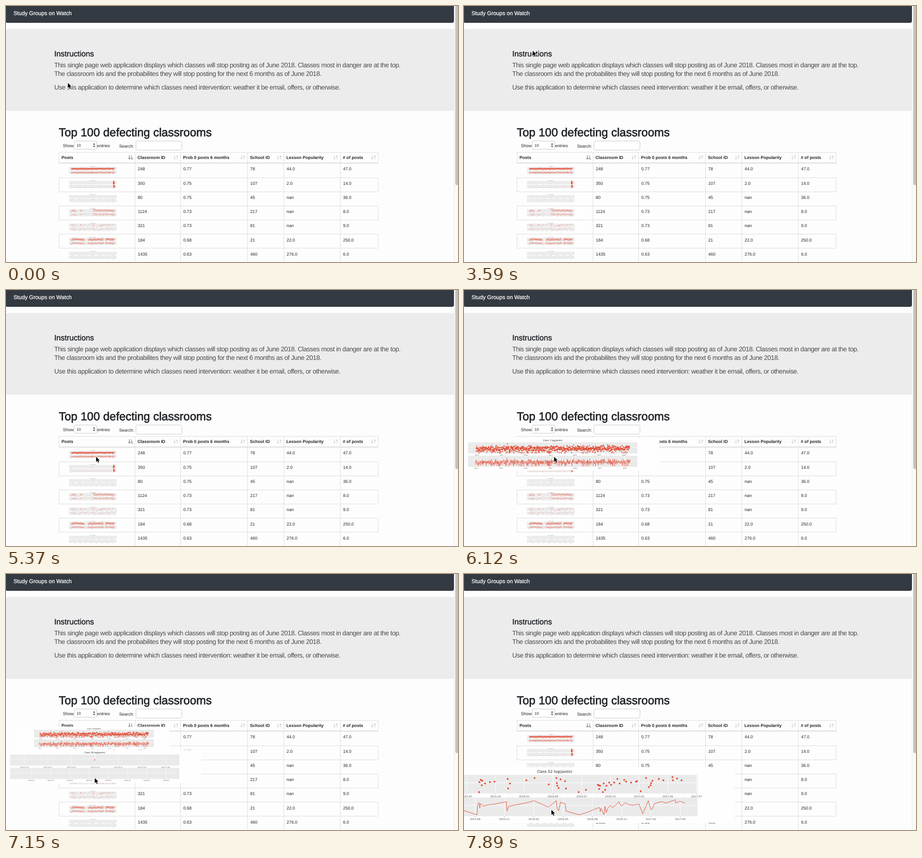
Write an HTML page that moves like this. It is 993 px wide and 564 px high and loops after 8 s.

```html
<!DOCTYPE html>
<html lang="en">
<head>
<meta charset="utf-8">
<title>Study Groups on Watch</title>
<style>
  html, body { margin: 0; width: 100%; height: 100%; overflow: hidden; background: #fdfdfd; }
  body { position: relative; }
  svg { position: absolute; display: block; text-rendering: geometricPrecision; }
  #page { left: 0; top: 0; width: 993px; height: 564px; font: 9.45px "Liberation Sans", Arial, sans-serif; fill: #212529; }
  .brand { font-size: 12.1px; fill: #fff; stroke: #fff; stroke-width: .3px; }
  .lead { font-size: 14.4px; letter-spacing: -.46px; fill: #484b4e; }
  .sub { font-size: 17.1px; stroke: #212529; stroke-width: .45px; }
  .title { font-size: 25.4px; stroke: #212529; stroke-width: .75px; }
  .head { font-weight: bold; }
  .small { font-size: 8.5px; }

  .chart { left: 189px; width: 135px; height: 20.5px; transform: translate(-50%, -50%); z-index: 0;
           font: 5.55px "DejaVu Sans", sans-serif; text-anchor: middle; }
  .chart .name { font-size: 8.1px; fill: #222; }
  .chart .tick { fill: #555; }
  .zoom1 { animation: zoom1 8s step-end infinite; }
  .zoom3 { animation: zoom3 8s step-end infinite; }
  .zoom5 { animation: zoom5 8s step-end infinite; }
  @keyframes zoom1 {
    0%      { width: 135px; height: 20.5px; z-index: 0; }
    76.5%   { width: 480px; height: 72.9px; z-index: 1; }
    78.25%  { width: 810px; height: 123px; z-index: 1; }
    89.375% { width: 340px; height: 51.6px; z-index: 1; }
    91.2%, 100% { width: 135px; height: 20.5px; z-index: 0; }
  }
  @keyframes zoom3 {
    0%      { width: 135px; height: 20.5px; z-index: 0; }
    89.375% { width: 480px; height: 72.9px; z-index: 1; }
    91.2%   { width: 810px; height: 123px; z-index: 1; }
    96.75%  { width: 340px; height: 51.6px; z-index: 1; }
    98.625%, 100% { width: 135px; height: 20.5px; z-index: 0; }
  }
  @keyframes zoom5 {
    0%      { width: 135px; height: 20.5px; z-index: 0; }
    96.75%  { width: 480px; height: 72.9px; z-index: 1; }
    98.625%, 100% { width: 810px; height: 123px; z-index: 1; }
  }

  #cursor { left: 0; top: 0; width: 11px; height: 17px; overflow: visible; z-index: 2;
            animation: point 8s step-end infinite; }
  @keyframes point {
    0%      { transform: translate(135px, 168px); }
    1.875%  { transform: translate(134px, 112px); }
    3.75%   { transform: translate(145px, 85px); }
    24.375% { transform: translate(145px, 86px); }
    30%     { transform: translate(145px, 88px); }
    33.625% { transform: translate(145px, 89px); }
    44.875% { transform: translate(150px, 97px); }
    46.71%  { transform: translate(161px, 110px); }
    48.55%  { transform: translate(185px, 142px); }
    50.39%  { transform: translate(214px, 190px); }
    52.23%  { transform: translate(229px, 240px); }
    54.07%  { transform: translate(222px, 285px); }
    55.91%  { transform: translate(208px, 318px); }
    57.75%  { transform: translate(199px, 337px); }
    59.625% { transform: translate(199px, 352px); }
    61.5%   { transform: translate(198px, 366px); }
    65.25%  { transform: translate(196px, 366px); }
    67.125% { transform: translate(197px, 366px); }
    82%     { transform: translate(197px, 372px); }
    83.84%  { transform: translate(196px, 390px); }
    85.68%  { transform: translate(195px, 412px); }
    87.5%   { transform: translate(194px, 433px); }
    89.375% { transform: translate(194px, 448px); }
    91.2%   { transform: translate(194px, 462px); }
    93.05%  { transform: translate(193px, 475px); }
    94.875% { transform: translate(193px, 485px); }
    96.75%  { transform: translate(192px, 503px); }
    98.625%, 100% { transform: translate(191px, 518px); }
  }
</style>
</head>
<body>
<svg id="page" viewBox="0 0 993 564"></svg>
<svg id="cursor" viewBox="0 0 11 17"><path d="M1 1.5v11.2l2.6-2.4 1.8 4.2 1.9-.8-1.8-4.1h3.5z" stroke="#fff" stroke-width="1.6" paint-order="stroke"/></svg>
<script>
const RED = '#e24a33', LINE = '#dcdcdc', PITCH = 31.25;
const text = (x, y, s, cls = '') => `<text x="${x}" y="${y}" class="${cls}">${s}</text>`;
const rect = (x, y, w, h, fill, more = '') => `<rect x="${x}" y="${y}" width="${w}" height="${h}" fill="${fill}" ${more}/>`;
const path = (d, color, width, more = '') => `<path d="${d}" fill="none" stroke="${color}" stroke-width="${width}" ${more}/>`;

const columns = [
  [116, 'Posts'], [283, 'Classroom ID'], [383, 'Prob 0 posts 6 months'],
  [530, 'School ID'], [610, 'Lesson Popularity'], [734, '# of posts'], [817]
];
const rows = [
  '248 0.77 78 44.0 47.0', '350 0.75 107 2.0 14.0', '80 0.75 45 nan 36.0', '1124 0.73 217 nan 8.0',
  '321 0.73 81 nan 9.0', '184 0.68 21 22.0 250.0', '1435 0.63 460 276.0 6.0'
].map(r => r.split(' '));
const rowTop = i => Math.floor(346.9 + 31.15 * i);

function drawPage() {
  const box = 'stroke="#c8c8c8" rx="3"';
  let s = rect(-.5, -5.5, 984, 42, '#343a42', 'rx="3" stroke="#2a2f36"')
    + rect(0, 50.5, 984, 180.5, '#ececec', 'rx="4"')
    + rect(984, 0, 9, 564, '#fafafa') + rect(984, 0, 1, 564, '#e9e9e9')
    + rect(987, -6, 8, 400.5, '#c2c2c2', 'rx="3.5"')
    + text(16.5, 19.5, 'Study Groups on Watch', 'brand')
    + text(106, 111, 'Instructions', 'sub')
    + text(106, 135, 'This single page web application displays which classes will stop posting as of June 2018. Classes most in danger are at the top.', 'lead')
    + text(106, 154, 'The classroom ids and the probabilites they will stop posting for the next 6 months as of June 2018.', 'lead')
    + text(106, 184, 'Use this application to determine which classes need intervention: weather it be email, offers, or otherwise.', 'lead')
    + text(116, 287, 'Top 100 defecting classrooms', 'title')
    + text(125, 311, 'Show') + text(200, 311, 'entries') + text(248.5, 312, 'Search:')
    + rect(149.5, 297.5, 50, 18, '#fff', box) + text(155, 310, '10', 'small')
    + rect(285.5, 297.5, 101, 20, '#fff', box)
    + '<path d="M191 305.5l2.5-3.2 2.5 3.2zM191 308l2.5 3.2 2.5-3.2z" fill="#444"/>';

  s += rect(116, 322, 702, 1, LINE) + rect(116, 345, 702, 2, LINE);
  columns.forEach(([x, name], i) => {
    const outer = i === 0 || i === columns.length - 1;
    if (outer) {
      s += rect(x, 322, 1, 24, LINE);
      for (let r = 1; r < 7; r += 2) s += rect(x, rowTop(r), 1, rowTop(r + 1) - rowTop(r), LINE);
    } else s += rect(x, 322, 1, 242, LINE);
    if (!name) return;
    s += text(x + 6, 337.3, name, 'head');
    const right = columns[i + 1][0];
    s += i
      ? path(`M${right - 12.5} 329v8m-2-2.2l2 2.4 2-2.4M${right - 7} 338v-8m-2 2.2l2-2.4 2 2.4`, '#cfcfcf', 1.1)
      : path('M271 329v8m-2-2.2l2 2.4 2-2.4M274.5 329.5h1.5m-1.5 2.6h2.5m-2.5 2.6h3.5m-3.5 2.6h4.5', '#777', 1.2);
  });
  rows.forEach((cells, i) => {
    if (i) s += rect(116, rowTop(i), 702, 1, LINE);
    cells.forEach((c, k) => s += text(columns[k + 1][0] + 6.5, 362.4 + PITCH * i, c));
  });
  document.getElementById('page').innerHTML = s;
}

function random(seed) {
  return () => {
    seed = seed + 0x6d2b79f5 | 0;
    let t = Math.imul(seed ^ seed >>> 15, 1 | seed);
    t = t + Math.imul(t ^ t >>> 7, 61 | t) ^ t;
    return ((t ^ t >>> 14) >>> 0) / 4294967296;
  };
}

// Noisy band of points within [from, to], with some outliers, low days and zero days.
function band(seed, from, to, count, spread = 5, mid = 40) {
  const rnd = random(seed);
  return Array.from({ length: count }, (_, i) => {
    const x = from + (to - from) * (i + rnd()) / count;
    const kind = rnd(), noise = (rnd() + rnd() + rnd() - 1.5) * 2;
    const y = kind < .035 ? 56
      : kind < .1 ? 46 + 9 * rnd()
      : kind < .11 ? 20 + 12 * rnd()
      : mid + noise * spread;
    return [x, Math.max(18, Math.min(56, y))];
  });
}

const sparse = [
  -10,41, 33,55, 34,33, 37,28, 39,40, 40,30, 46,36, 57,33, 67,32, 96,26, 97,47, 101,36, 137,29, 155,24, 186,38,
  203,24, 204,35, 205,41, 208,46, 212,27, 222,31, 224,47, 252,55, 268,50, 294,39, 296,40, 297,48, 299,41,
  305,55, 307,36, 310,50, 313,41, 319,34, 323,39, 330,34, 337,26, 342,36, 352,28, 356,32, 367,34, 378,32,
  380,31, 388,53, 400,24, 406,44, 410,40, 411,35, 414,30, 428,26, 438,29, 458,22, 459,29, 468,25, 478,29
].reduce((list, v, i) => (i % 2 ? list.at(-1).push(v) : list.push([v]), list), []);

const axis = (x, gap, count, start, step, length) => Array.from({ length: count }, (_, i) => [
  x + gap * i,
  new Date(Date.UTC(...start.map((v, k) => v + step[k] * i))).toISOString().slice(0, length)
]);
const yearsTop = axis(-82, 90.8, 7, [2012, 0, 1], [1, 0, 0], 4);
const yearsLow = axis(-85, 91.8, 7, [2012, 0, 1], [1, 0, 0], 4);
const daysTop = axis(-62, 87.2, 7, [2014, 9, 19], [0, 0, 3], 10);
const halvesLow = axis(-36, 71.3, 8, [2013, 2, 1], [0, 6, 0], 7);
const single = { points: [[199, 37]], top: daysTop, low: halvesLow };

const charts = [
  { id: 1, points: band(7, -85, 484, 900) },
  { id: 12, points: [[-82, 54], [200, 50], [466, 42], ...band(3, 468, 484, 90, 12, 37)] },
  { id: 28, ...single },
  { id: 40, points: [...band(11, -86, -16, 30, 8), ...band(12, 29, 64, 12, 8), ...band(13, 202, 484, 160, 7, 34)] },
  { id: 52, points: [...band(21, -85, -25, 14, 9, 38), ...sparse], low: axis(-40, 64.4, 9, [2015, 4, 1], [0, 3, 0], 7),
    top: axis(-57, 63.1, 10, [2015, 3, 1], [0, 3, 0], 7), scale: 1.025, shift: -5.15 },
  { id: 61, points: [...band(31, -86, 88, 150, 8), ...band(32, 136, 340, 170, 8), ...band(33, 364, 484, 110, 8, 36)] },
  { id: 77, ...single }
];

function panel(y, ticks) {
  let s = rect(-115, y, 628, 41, '#eaeaea') + path(`M-115 ${y + 17.5}h628`, '#fff', 1);
  for (const [x, label] of ticks) {
    s += path(`M${x} ${y}v41`, '#fff', 1) + path(`M${x} ${y + 41}v2`, '#666', .6) + text(x, y + 49, label, 'tick');
  }
  return s;
}

function drawChart(chart, row) {
  const { id, points, top = yearsTop, low = yearsLow, scale = 1.011, shift = -2 } = chart;
  const at = n => n.toFixed(1);
  const dots = points.map(([x, y]) => `M${at(x)} ${at(y)}h0`).join('');
  const line = points.map(([x, y]) => `${at(x * scale + shift)} ${at(y + 50)}`).join('L');
  const inner = rect(-216, 0, 810, 123, '#fefefe') + text(199, 12.8, `Class ${id} log(posts)`, 'name')
    + panel(17, top) + panel(67, low)
    + path(dots, RED, 4, 'stroke-linecap="round"')
    + (points.length > 1 ? path('M' + line, RED, 1, 'stroke-linejoin="round"') : '');
  document.body.insertAdjacentHTML('beforeend',
    `<svg class="chart zoom${row + 1}" viewBox="-216 0 810 123" style="top:${361.5 + PITCH * row}px">${inner}</svg>`);
}

drawPage();
charts.forEach(drawChart);
</script>
</body>
</html>
```
